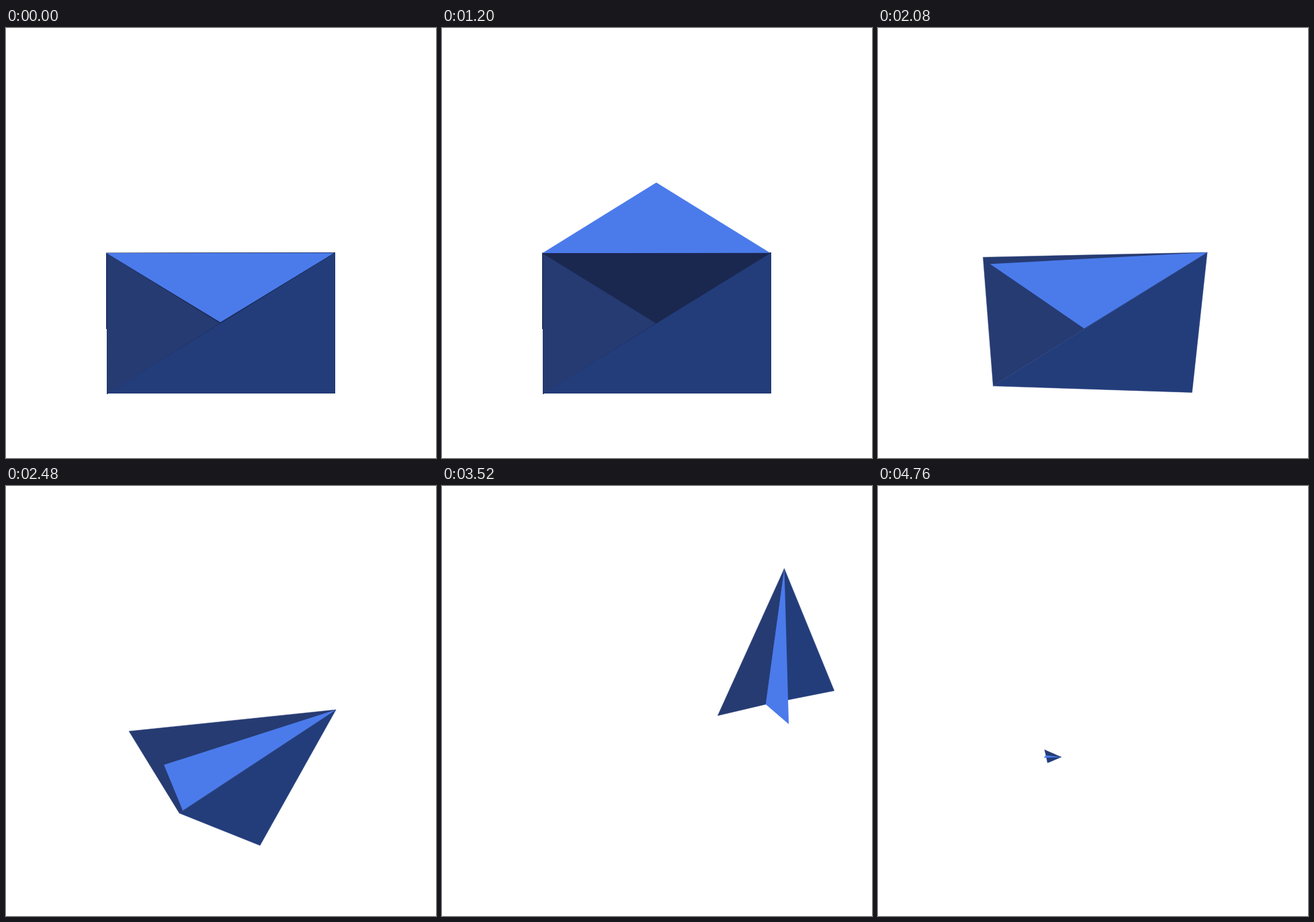
Write an HTML page that moves like this. It is 640 px wide and 640 px high and loops after 4800 ms.

```html
<!DOCTYPE html>
<html lang="en">
<head>
<meta charset="utf-8">
<title>Envelope to paper plane</title>
<style>
  html, body { margin: 0; width: 100%; height: 100%; overflow: hidden; background: #fff; }
  svg { display: block; width: 100vw; height: 100vh; }
  .left { fill: #263b72; stroke: #263b72; stroke-width: .5; }
  .right { fill: #233d7b; stroke: #233d7b; stroke-width: .5; }
  .flap { fill: #4b7beb; }
  .inner { fill: #1a2850; }
  .letter { fill: #6a93f1; }
</style>
</head>
<body>
<svg viewBox="0 0 640 640">
  <polygon id="inner" class="inner" points="149,334.5 490,334 490,544 151.5,544 151.5,545 150,545 150,448 149,448"/>
  <polygon id="flapBack" class="flap"/>
  <rect id="letter" class="letter" x="182" width="273.5" height="190"/>
  <polygon id="left" class="left"/>
  <polygon id="right" class="right"/>
  <polygon id="flapFront" class="flap"/>
</svg>
<script>
const LOOP = 4800, STEP = 40;
const FOLD = 1980, FOLD_MID = 2480, FLY = 3120;
const el = Object.fromEntries([...document.querySelectorAll('[id]')].map(n => [n.id, n]));

const clamp = x => Math.min(1, Math.max(0, x));
const span = (t, a, b) => clamp((t - a) / (b - a));
const mix = (a, b, p) => a + (b - a) * p;
const show = (node, on) => node.setAttribute('visibility', on ? 'visible' : 'hidden');
const draw = (node, ...pts) => {
  node.setAttribute('points', pts.map(p => p.map(v => v.toFixed(2)).join()).join(' '));
  show(node, true);
};

// Corner offsets from the nose while the envelope folds into a plane
const folds = {
  L: [[-340, 1], [-308, 32], [-283, 68]],
  R: [[0, 210], [-113, 202], [-119, 206]],
  F: [[-340, 1], [-256, 82], [-214, 124]],
  K: [[-172, 104], [-228, 150], [-217, 179]],
  C: [[-340, 210], [-233, 154], [-214, 124]]
};

// Rigid plane: forward and sideways distance from its centre
const plane = { T: [127, 0], L: [-152, -83], R: [-79, 119], F: [-120, 0], K: [-150, 46], C: [-120, 0] };

// Flight: time, x, y, heading in degrees, scale (outer rows only shape the ends)
const flight = [
  [2480, 371, 412, 33.5, 1.13],
  [3120, 440, 342, 30, 1],
  [3500, 494, 234, 79, .835],
  [3680, 496, 165, 110, .745],
  [3920, 388, 97, 153.8, .604],
  [4080, 274, 98, 186, .507],
  [4240, 169.5, 130, 221, .41],
  [4480, 56, 268, 276, .262],
  [4760, 261, 402, 353, .093],
  [5040, 470, 319, 428, -.07]
];

const slope = (a, b, k) => (b[k] - a[k]) / (b[0] - a[0]);

function tangent(i, k) {
  const [a, b, c] = flight.slice(i - 1, i + 2);
  const before = b[0] - a[0], after = c[0] - b[0];
  return (slope(a, b, k) * after + slope(b, c, k) * before) / (before + after);
}

function flightAt(t) {
  let i = 1;
  while (i < flight.length - 3 && t > flight[i + 1][0]) i++;
  const a = flight[i], b = flight[i + 1], d = b[0] - a[0], u = (t - a[0]) / d;
  return [1, 2, 3, 4].map(k =>
    mix(a[k], b[k], u * u * (3 - 2 * u)) +
    d * u * (1 - u) * ((1 - u) * tangent(i, k) - u * tangent(i + 1, k)));
}

function foldedPoints(t) {
  const q = span(t, 2382, FLY) ** 2;
  const nose = [490 + 60 * q, 334 - 56 * q];
  const late = t >= FOLD_MID ? 1 : 0;
  const p = late ? 1 - (1 - span(t, FOLD_MID, FLY)) ** 2 : span(t, FOLD, FOLD_MID);
  const pts = { T: nose };
  for (const [name, keys] of Object.entries(folds))
    pts[name] = nose.map((v, k) => v + mix(keys[late][k], keys[late + 1][k], p));
  return pts;
}

function flyingPoints(t) {
  const [x, y, heading, scale] = flightAt(t);
  const a = heading * Math.PI / 180, c = Math.cos(a) * scale, s = Math.sin(a) * scale;
  const pts = {};
  for (const [name, [u, v]] of Object.entries(plane))
    pts[name] = [x + u * c + v * s, y - u * s + v * c];
  return pts;
}

function drawPlane(t) {
  const { T, L, R, F, K, C } = t < FLY ? foldedPoints(t) : flyingPoints(t);
  for (const n of [el.inner, el.flapBack, el.letter]) show(n, false);
  draw(el.left, T, L, C);
  draw(el.right, T, R, C);
  draw(el.flapFront, T, F, K);
}

function drawEnvelope(t) {
  const opening = 230 + 208 * (1 - span(t, 120, 1200)) ** 2.09;
  const tip = t < 1780 ? opening : mix(230, 438, span(t, 1780, 1960));
  const above = tip < 335;
  show(el.inner, true);
  draw(el.left, [150.2, 336], [318, 439.5], [150.5, 544]);
  draw(el.right, [489.5, 335], [489.5, 543.5], [151, 543.5]);
  draw(above ? el.flapBack : el.flapFront, [149.5, 335], [319, tip], [488.5, 334.8]);
  show(above ? el.flapFront : el.flapBack, false);

  show(el.letter, t > 1440);
  el.letter.setAttribute('y', mix(141, 387, span(t, 1480, 1840)));
  el.letter.setAttribute('height', Math.min(190, 540 - el.letter.getAttribute('y')));
  el.letter.setAttribute('opacity', span(t, 1440, 1740));
}

function render(ms) {
  const t = Math.floor(ms % LOOP / STEP) * STEP;
  (t < FOLD ? drawEnvelope : drawPlane)(t);
}

const start = performance.now();
function tick() {
  render(performance.now() - start);
  requestAnimationFrame(tick);
}
tick();
</script>
</body>
</html>
```
